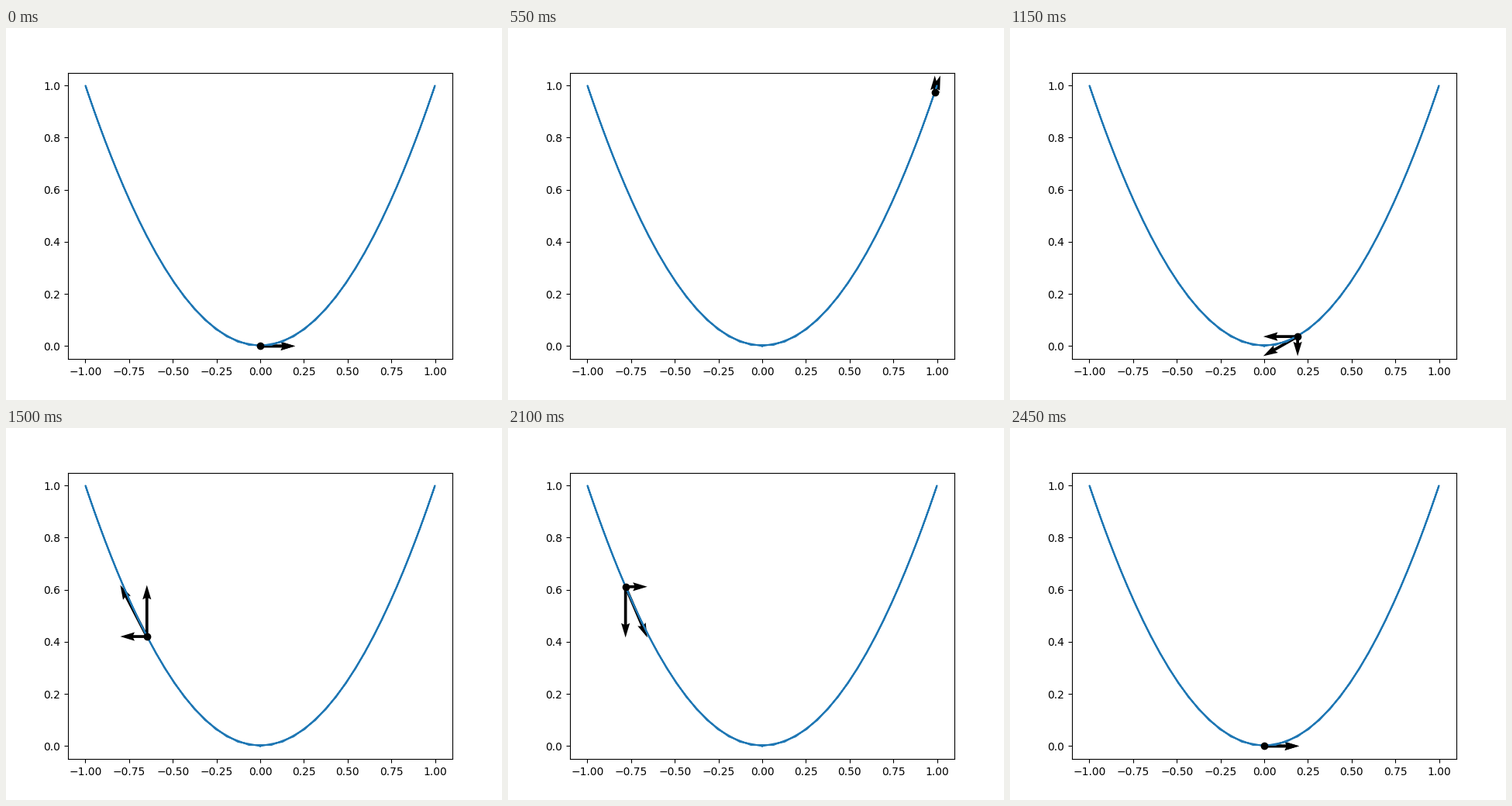
A matplotlib script that plays this animation: 640 by 480 pixels, repeating every 2.5 s.

```python
import numpy as np
import matplotlib.pyplot as plt
from matplotlib.animation import FuncAnimation

FRAMES = 50
INTERVAL = 50

# Point oscillating along a parabola, with its velocity and components
t = np.linspace(0, 2 * np.pi, FRAMES)
x, y = np.sin(t), np.sin(t) ** 2
vx, vy = np.cos(t), 2 * np.sin(t) * np.cos(t)

fig, ax = plt.subplots(figsize=(6.4, 4.8), dpi=100)
ax.plot(x, y)
point, = ax.plot([x[0]], [y[0]], "ko")


def components(i):
    return [vx[i], vx[i], 0], [vy[i], 0, vy[i]]


arrows = ax.quiver([x[0]] * 3, [y[0]] * 3, *components(0),
                   angles="xy", scale_units="xy", scale=5)


def update(i):
    point.set_data([x[i]], [y[i]])
    arrows.set_offsets([(x[i], y[i])] * 3)
    arrows.set_UVC(*components(i))
    return point, arrows


anim = FuncAnimation(fig, update, frames=FRAMES, interval=INTERVAL,
                     repeat=True, repeat_delay=0)
plt.show()
```
